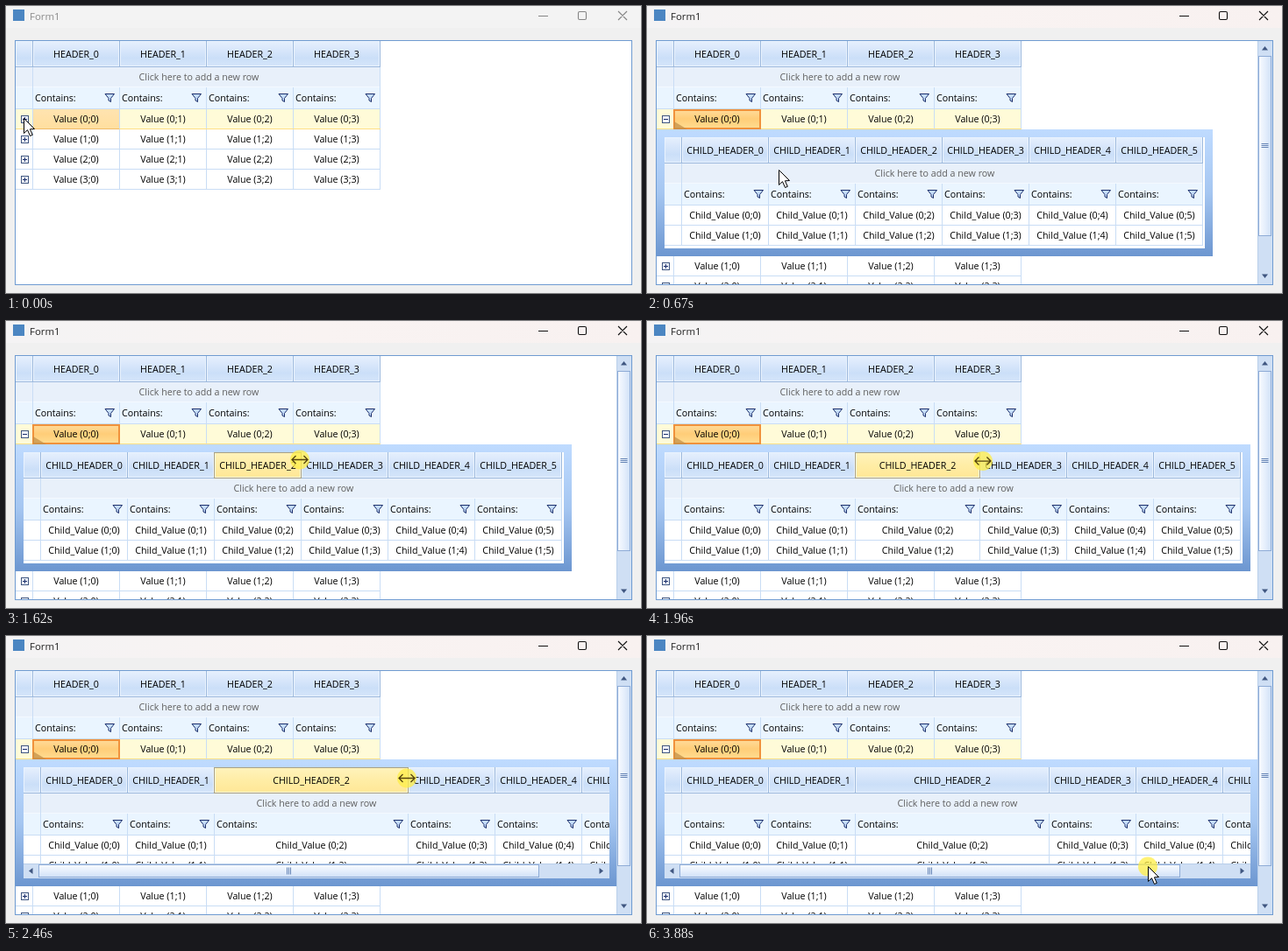
Recreate the animation shown at these times as an HTML page with a canvas. Size 724x328 px, loop 3940 ms.

```html
<!DOCTYPE html>
<html lang="en">
<head>
<meta charset="utf-8">
<title>Form1</title>
<style>
html, body { margin: 0; width: 100%; height: 100%; overflow: hidden; background: #f0f0f0; }
canvas { display: block; }
</style>
</head>
<body>
<canvas id="stage" width="724" height="328"></canvas>
<script>
const c = document.getElementById('stage').getContext('2d');
const LOOP = 3940, START = 130, STEP = 68, LAST = 55;
const COL = 99, ROW = 23, STRETCH = 122;
const LINE = '#c9ddf5', NAVY = '#1c2f6b';
const FONT = '10.7px "Open Sans", "Noto Sans", sans-serif';
const TITLE_FONT = '11.4px "Open Sans", "Noto Sans", sans-serif';

const clamp = v => Math.max(0, Math.min(1, v));
const ease = (a, b, n) => 1 - (1 - clamp((n - a) / (b - a))) ** 1.4;

// Pointer legs: start and end tick, destination
const legs = [
  [0, 4, 22, 130], [4, 8, 150, 187], [8, 13, 296, 168], [13, 17, 335, 158],
  [24, 34, 457, 162], [42, 47, 530, 248], [47, 50, 530, 267], [53, 55, 571, 263]
];
const presses = [[-1, 3], [19, 38], [53, 60]];

function pointerAt(n) {
  return legs.reduce(([x, y], [a, b, u, v]) => {
    const p = ease(a, b, n);
    return [x + (u - x) * p, y + (v - y) * p];
  }, [20, 128]);
}

const glowAt = n => Math.max(...presses.map(([a, b]) => clamp(Math.min(n - a, b - n) / 2)));
// The column edge trails the pointer slightly
const growAt = n => Math.min(STRETCH, Math.round((STRETCH + 1) * ease(24, 34, n - .35)));

function rect(x, y, w, h, fill) {
  c.fillStyle = fill;
  c.fillRect(x, y, w, h);
}

function frame(x, y, w, h, color, width = 1) {
  c.strokeStyle = color;
  c.lineWidth = width;
  c.strokeRect(x + width / 2, y + width / 2, w - width, h - width);
}

function blend(x0, y0, x1, y1, ...colors) {
  const g = c.createLinearGradient(x0, y0, x1, y1);
  colors.forEach((k, i) => g.addColorStop(i / (colors.length - 1), k));
  return g;
}
const down = (y, h, ...colors) => blend(0, y, 0, y + h, ...colors);

function poly(x, y, points, fill, stroke) {
  c.beginPath();
  points.forEach(([a, b]) => c.lineTo(x + a, y + b));
  c.closePath();
  c.fillStyle = fill;
  c.fill();
  if (!stroke) return;
  c.strokeStyle = stroke;
  c.lineWidth = 1;
  c.stroke();
}

function text(s, x, y, align = 'center', color = '#000', font = FONT) {
  c.font = font;
  c.textAlign = align;
  c.fillStyle = color;
  c.fillText(s, x, y + 4);
}

function clipped(x, y, w, h, paint) {
  c.save();
  c.beginPath();
  c.rect(x, y, w, h);
  c.clip();
  paint();
  c.restore();
}

function titleBar(active) {
  const ink = active ? '#111' : '#858585';
  rect(0, 0, 724, 25, active ? blend(0, 0, 724, 0, '#f4f3f4', '#f9f3f2', '#f8f1f0') : '#f3f3f3');
  rect(8, 4, 13, 13, '#4b86c2');
  text('Form1', 27, 12, 'left', active ? '#222' : '#8b8b8b', TITLE_FONT);
  rect(607, 11, 11, 1, ink);
  c.strokeStyle = ink;
  c.lineWidth = 1.1;
  c.beginPath();
  c.roundRect(652.5, 6.5, 9, 9, 1.5);
  c.moveTo(698, 6);
  c.lineTo(708, 16);
  c.moveTo(708, 6);
  c.lineTo(698, 16);
  c.stroke();
}

function funnel(x, y) {
  poly(x, y, [[-5, -4.5], [5.5, -4.5], [1.5, .5], [1.5, 4.5], [-1, 3], [-1, .5]], '#c4dcfa', NAVY);
}

function headCell(x, y, w, hot) {
  rect(x, y, w, 29, hot ? down(y, 29, '#fff3bd', '#ffeda6', '#ffe796')
    : down(y, 29, '#e6f0fd', '#d9e7fb', '#cbdff8', '#d5e5fa'));
  frame(x, y, w, 29, hot ? '#fff8dc' : '#eaf3fe');
  rect(x + w, y, 1, 30, '#9db9dd');
  rect(x, y + 29, w, 1, '#9db9dd');
  if (hot) frame(x - 1, y, w + 2, 30, '#a9a183');
}

function edgesOf(x, widths) {
  const edges = [x + 19];
  widths.forEach(w => edges.push(edges[edges.length - 1] + w));
  return edges;
}

function dataRow(x, y, edges, label, row, bg = '#fff') {
  const w = edges[edges.length - 1] - x;
  rect(x, y, w, ROW, bg);
  rect(x, y + ROW - 1, w + 1, 1, LINE);
  edges.forEach((e, i) => {
    rect(e, y, 1, ROW, LINE);
    if (i) text(`${label} (${row};${i - 1})`, (edges[i - 1] + e + 1) / 2, y + 11);
  });
}

// Header, new-row and filter bands
function tableTop(x, y, edges, label, middle, hot = -1) {
  const right = edges[edges.length - 1], w = right - x;
  headCell(x, y, 19, false);
  rect(x, y + 30, w, 22, '#e8f0fa');
  rect(x, y + 52, w, 1, '#f4f9ff');
  rect(x, y + 53, w, 25, '#eaf5ff');
  rect(x, y + 77, w, 1, LINE);
  rect(edges[0], y + 30, 1, 23, LINE);
  rect(right, y + 30, 1, 23, LINE);
  text('Click here to add a new row', middle, y + 41, 'center', '#5f5f5f');
  edges.forEach((e, i) => {
    rect(e, y + 53, 1, 25, LINE);
    if (!i) return;
    const left = edges[i - 1];
    headCell(left + 1, y, e - left - 1, hot === i - 1);
    text(label + (i - 1), (left + e + 1) / 2, y + 15);
    text('Contains:', left + 3, y + 65, 'left');
    funnel(e - 11, y + 65);
  });
}

function expander(y, open) {
  rect(17, y - 4, 9, 9, '#f3f8ff');
  frame(17, y - 4, 9, 9, '#3f557f');
  rect(19, y, 5, 1, NAVY);
  if (!open) rect(21, y - 2, 1, 5, NAVY);
}

// Draws along x; a vertical bar is the same bar turned a quarter
function scrollBar(x, y, length, thick, from, size, turned) {
  c.save();
  c.translate(x, y);
  if (turned) c.transform(0, 1, 1, 0, 0, 0);
  const mid = thick / 2, head = [[-2.5, 0], [2, -3.5], [2, 3.5]];
  rect(0, 0, length, thick, '#cfdff4');
  rect(0, 0, length, 1, '#b9cfea');
  poly(8.5, mid, head, '#3f5680');
  poly(length - 9.5, mid, head.map(([a, b]) => [-a, b]), '#3f5680');
  rect(from, 1, size, thick - 2, down(1, thick - 2, '#fafcff', '#e6effc', '#cfe0f7'));
  frame(from, 1, size, thick - 2, '#8eabd6');
  for (let i = -3; i < 3; i += 2) rect(Math.round(from + size / 2) + i, mid - 4, 1, 8, '#6483b4');
  c.restore();
}

function childPanel(grow, hot) {
  const view = Math.min(636 + grow, 688), end = Math.min(645 + grow, 696);
  const edges = edgesOf(20, [0, 0, grow, 0, 0, 0].map(g => COL + g));
  rect(11, 141, end - 11, 145, down(141, 145, '#bfdbff', '#a5c6f1', '#6c96d0'));
  clipped(20, 150, view - 20, 127, () => {
    rect(20, 150, view - 20, 127, '#fff');
    tableTop(20, 150, edges, 'CHILD_HEADER_', (20 + view) / 2, hot ? 2 : -1);
    for (let r = 0; r < 2; r++) dataRow(20, 228 + r * ROW, edges, 'Child_Value', r);
    if (636 + grow > 688) scrollBar(20, 260, 668, 17, 17, 571);
  });
}

function currentCell(active) {
  rect(11, 140, 416, 1, '#ffdf86');
  rect(31, 118, 98, 22, active ? down(118, 22, '#ffdc9c', '#ffcd78', '#ffdc90')
    : down(118, 22, '#ffe3b0', '#ffdf9f'));
  if (active) frame(30, 118, 100, 23, '#f0923c', 2);
  else rect(30, 140, 99, 1, '#f0bb68');
  text('Value (0;0)', 80, 129);
}

function mainGrid(n) {
  const open = n >= 1;
  const edges = edgesOf(11, Array(4).fill(COL));
  rect(10, 39, 704, 280, '#fff');
  clipped(11, 40, 702, 278, () => {
    tableTop(11, 40, edges, 'HEADER_', 220);
    for (let r = 0; r < 4; r++) {
      const y = 118 + r * ROW + (open && r ? 145 : 0);
      dataRow(11, y, edges, 'Value', r, r ? '#fff' : '#fffbd8');
      if (!r) currentCell(n >= 0);
      expander(y + 11, open && !r);
    }
    if (!open) return;
    if (n >= 6) poly(31, 132, [[0, 0], [15, 9], [0, 9]], 'rgba(196,144,72,.75)');
    childPanel(growAt(n), n >= 11 && n < 38);
    scrollBar(696, 40, 278, 17, 17, 206, true);
  });
  frame(10, 39, 704, 280, '#6f9bd1');
}

function arrow(x, y) {
  const shape = [[0, 0], [0, 17], [4, 13.2], [7, 20], [9.8, 18.8], [6.9, 12.3], [12, 12]];
  poly(x + .5, y + .5, shape, '#fff', '#000');
}

function sizer(x, y, ink) {
  c.strokeStyle = ink;
  c.lineWidth = 1.3;
  c.beginPath();
  for (const side of [-9, 9]) {
    c.moveTo(x, y);
    c.lineTo(x + side, y);
    c.moveTo(x + side * .5, y - 4.5);
    c.lineTo(x + side, y);
    c.lineTo(x + side * .5, y + 4.5);
  }
  c.stroke();
}

function draw(t) {
  const n = Math.min(LAST, Math.floor((t - START) / STEP + .1));
  const [x, y] = pointerAt(n), glow = glowAt(n);
  rect(0, 0, 724, 328, '#f0f0f0');
  titleBar(n >= 0);
  mainGrid(n);
  if (glow) {
    c.fillStyle = `rgba(255,238,70,${glow * .75})`;
    c.beginPath();
    c.arc(x, y + .5, 11, 0, 7);
    c.fill();
  }
  if (n >= 17 && n < 39) sizer(x, y + .5, glow ? '#54430f' : '#000');
  else arrow(Math.round(x), Math.round(y));
}

const begin = performance.now();
function tick() {
  draw((performance.now() - begin) % LOOP);
  requestAnimationFrame(tick);
}
tick();
</script>
</body>
</html>
```
